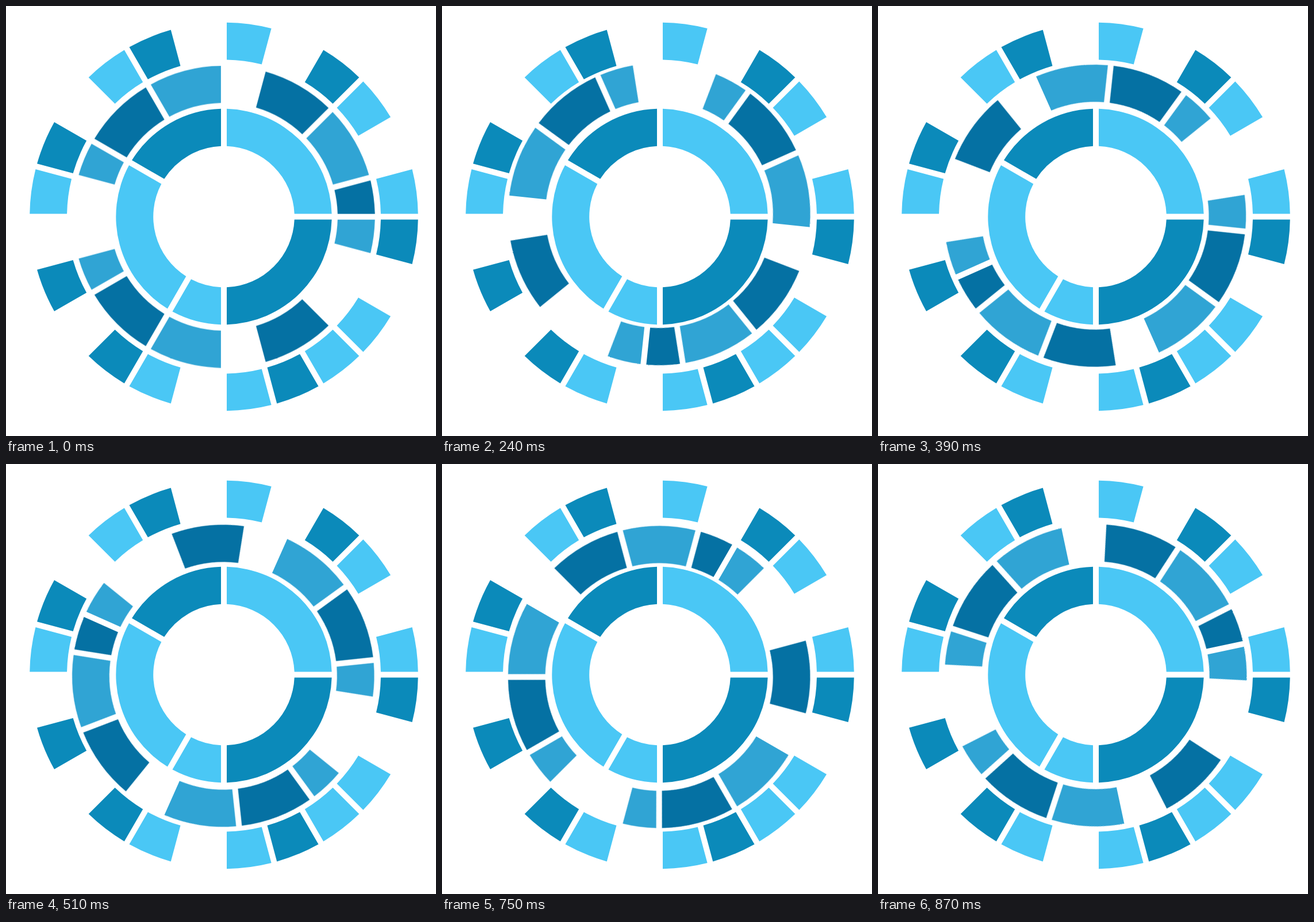
Write an HTML page that moves like this. It is 748 by 748 pixels and loops after 900 ms.

```html
<!DOCTYPE html>
<html lang="en">
<head>
<meta charset="utf-8">
<title>Rotating ring chart</title>
<style>
  html, body { margin: 0; width: 100%; height: 100%; overflow: hidden; background: #fff; }
  svg { display: block; width: 100vw; height: 100vh; }
</style>
</head>
<body>
<svg viewBox="0 0 748 748">
  <g id="inner" transform="translate(379 366.5)"></g>
  <g id="outer" transform="translate(379 366.5)"></g>
  <g id="middle"></g>
</svg>
<script>
const COLORS = { sky: '#4ac7f5', teal: '#0b8aba', navy: '#0571a3', blue: '#30a4d4' };
const HALF_GAP = 5;
const RAD = Math.PI / 180;

// Point at radius r beside the spoke at deg (clockwise from the top).
function point(r, deg, side) {
  const a = deg * RAD + side * Math.asin(HALF_GAP / r);
  return `${(r * Math.sin(a)).toFixed(2)} ${(-r * Math.cos(a)).toFixed(2)}`;
}

function ring(id, r0, r1, segments) {
  const group = document.getElementById(id);
  for (const [color, from, to] of segments) {
    const path = document.createElementNS('http://www.w3.org/2000/svg', 'path');
    path.setAttribute('d',
      `M${point(r0, from, 1)}L${point(r1, from, 1)}` +
      `A${r1} ${r1} 0 0 1 ${point(r1, to, -1)}` +
      `L${point(r0, to, -1)}A${r0} ${r0} 0 0 0 ${point(r0, from, 1)}Z`);
    path.setAttribute('fill', COLORS[color]);
    group.append(path);
  }
  return group;
}

ring('inner', 122.8, 187.7, [
  ['sky', 0, 90], ['teal', 90, 180], ['sky', 180, 210], ['sky', 210, 300], ['teal', 300, 360]
]);

ring('outer', 273, 337.8, [
  ['sky', 0, 15], ['teal', 30, 45], ['sky', 45, 60], ['sky', 75, 90],
  ['teal', 90, 105], ['sky', 120, 135], ['sky', 135, 150], ['teal', 150, 165],
  ['sky', 165, 180], ['sky', 195, 210], ['teal', 210, 225], ['teal', 240, 255],
  ['sky', 270, 285], ['teal', 285, 300], ['sky', 315, 330], ['teal', 330, 345]
]);

const middle = ring('middle', 198, 262.8, [
  ['navy', 15, 45], ['blue', 45, 75], ['navy', 75, 90], ['blue', 90, 105],
  ['navy', 135, 165], ['blue', 180, 210], ['navy', 210, 240], ['blue', 240, 255],
  ['blue', 285, 300], ['navy', 300, 330], ['blue', 330, 360]
]);

// The middle ring turns in 30 ms steps while its centre bobs slightly.
const STEPS = 30;
const poses = Array.from({ length: STEPS + 1 }, (_, i) => {
  const deg = i * 360 / STEPS, a = deg * RAD;
  const x = 378 + 0.6 * Math.cos(a) + 0.2 * Math.sin(a) + 0.25 * Math.cos(2 * a) + 0.4 * Math.sin(2 * a);
  const y = 366.6 - 4.5 * Math.sin(a);
  return {
    transform: `translate(${x.toFixed(2)}px, ${y.toFixed(2)}px) rotate(${deg}deg)`,
    easing: 'steps(1, end)'
  };
});
middle.animate(poses, { duration: 900, iterations: Infinity });
</script>
</body>
</html>
```
